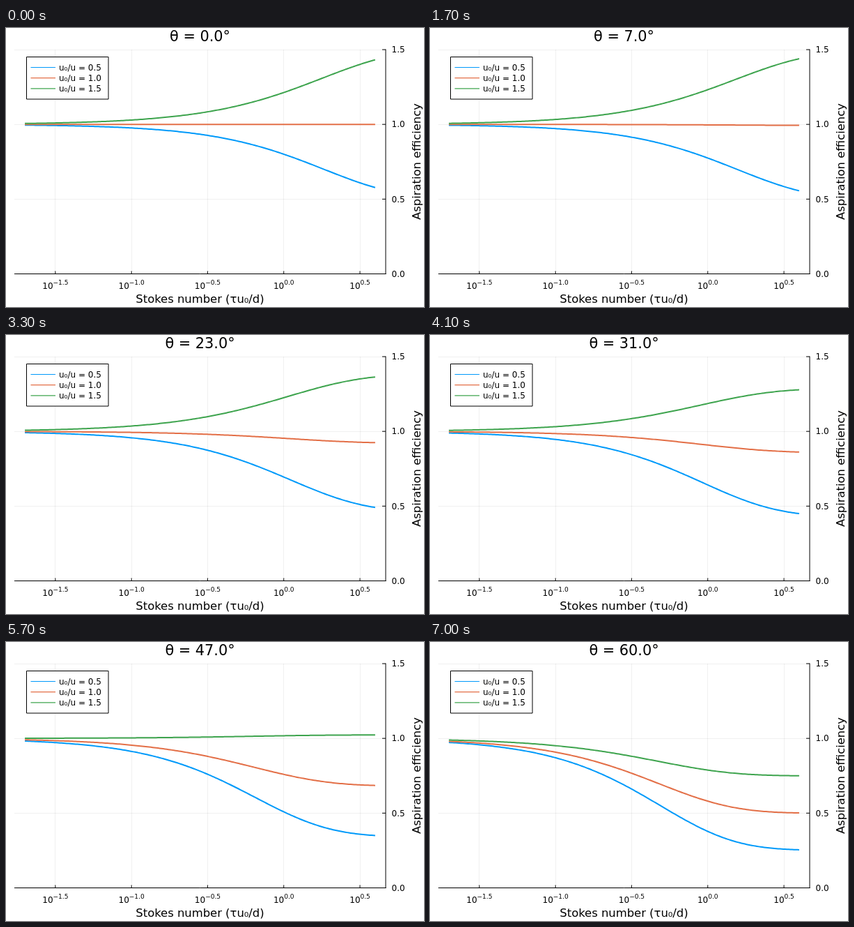
An HTML page with a canvas that plays this animation: 600x400 px, repeating every 8050 ms.

```html
<!DOCTYPE html>
<html lang="en">
<head>
<meta charset="utf-8">
<title>Aspiration efficiency</title>
<style>
html, body { margin: 0; width: 100%; height: 100%; overflow: hidden; background: #fff; }
canvas { display: block; width: 600px; height: 400px; }
</style>
</head>
<body>
<canvas id="chart" width="600" height="400"></canvas>
<script>
const ctx = document.getElementById("chart").getContext("2d");

const LOOP = 8050, HOLD = 1050, STEP = 50;
const LEFT = 12, RIGHT = 545, TOP = 31, BOTTOM = 352.5;
const LOG_MIN = -1.7, LOG_MAX = 0.6;
const SERIES = [
  { ratio: 0.5, color: "#009afa" },
  { ratio: 1.0, color: "#e36f47" },
  { ratio: 1.5, color: "#3ea44e" }
];
const X_TICKS = [-1.5, -1, -0.5, 0, 0.5];
const Y_TICKS = [0, 0.5, 1, 1.5];

// The x axis is 3% wider than the data on each side.
const pad = 0.03 * (LOG_MAX - LOG_MIN);
const xAt = log => LEFT + (log - LOG_MIN + pad) / (LOG_MAX - LOG_MIN + 2 * pad) * (RIGHT - LEFT);
const yAt = value => BOTTOM - value / 1.5 * (BOTTOM - TOP);
const crisp = v => Math.floor(v) + 0.5;

function line(x1, y1, x2, y2, color, width) {
  ctx.strokeStyle = color;
  ctx.lineWidth = width;
  ctx.beginPath();
  ctx.moveTo(x1, y1);
  ctx.lineTo(x2, y2);
  ctx.stroke();
}

function setFont(size) {
  ctx.font = `${size}px "DejaVu Sans", sans-serif`;
}

function text(str, x, y, size, align = "left") {
  setFont(size);
  ctx.fillStyle = "#000";
  ctx.textAlign = align;
  ctx.fillText(str, x, y);
}

function powerLabel(exponent, x, y) {
  const power = exponent.toFixed(1).replace("-", "−");
  setFont(12);
  const baseWidth = ctx.measureText("10").width;
  setFont(9);
  const start = x - (baseWidth + ctx.measureText(power).width) / 2;
  text("10", start, y, 12);
  text(power, start + baseWidth, y - 5.5, 9);
}

function drawAxes() {
  const grid = "rgba(0,0,0,0.06)";
  for (const v of X_TICKS) line(crisp(xAt(v)), TOP, crisp(xAt(v)), BOTTOM, grid, 1);
  for (const v of Y_TICKS) line(LEFT, crisp(yAt(v)), RIGHT, crisp(yAt(v)), grid, 1);

  line(LEFT, BOTTOM, RIGHT + 0.5, BOTTOM, "#000", 1);
  line(RIGHT, TOP - 0.5, RIGHT, BOTTOM + 0.5, "#000", 1);
  for (const v of X_TICKS) {
    line(xAt(v), BOTTOM, xAt(v), BOTTOM - 4, "#000", 1);
    powerLabel(v, xAt(v), 373.5);
  }
  for (const v of Y_TICKS) {
    line(RIGHT, yAt(v), RIGHT - 5, yAt(v), "#000", 1);
    text(v.toFixed(1), 553.5, yAt(v) + 4.3, 12);
  }

  text("Stokes number (τu₀/d)", 278.5, 393.5, 16.4, "center");
  ctx.save();
  ctx.translate(595, 191.5);
  ctx.rotate(-Math.PI / 2);
  text("Aspiration efficiency", 0, 0, 16.4, "center");
  ctx.restore();
}

function drawLegend() {
  ctx.fillStyle = "#fff";
  ctx.fillRect(29.5, 41.5, 117.5, 60.5);
  ctx.strokeStyle = "#000";
  ctx.lineWidth = 1;
  ctx.strokeRect(29.5, 41.5, 117.5, 60.5);
  SERIES.forEach(({ ratio, color }, i) => {
    const y = 56.5 + 15.2 * i;
    line(35.5, y, 71, y, color, 1.2);
    text(`u₀/u = ${ratio.toFixed(1)}`, 76, y + 4.3, 12);
  });
}

const saturate = v => v / (1 + v);

// Sampling efficiency of a thin-walled probe inclined by an angle in degrees.
function efficiency(stokes, ratio, angle) {
  const s = stokes * Math.exp(0.022 * angle);
  const beta = saturate((2 + 0.617 * ratio) * s) / saturate(2.617 * s)
    * saturate(0.55 * s * Math.exp(0.25 * s));
  return 1 + (ratio * Math.cos(angle * Math.PI / 180) - 1) * beta;
}

function drawCurve({ ratio, color }, angle) {
  const samples = 200;
  ctx.strokeStyle = color;
  ctx.lineWidth = 2;
  ctx.lineJoin = "round";
  ctx.beginPath();
  for (let i = 0; i <= samples; i++) {
    const log = LOG_MIN + (LOG_MAX - LOG_MIN) * i / samples;
    ctx.lineTo(xAt(log), yAt(efficiency(10 ** log, ratio, angle)));
  }
  ctx.stroke();
}

function angleAt(time) {
  const steps = Math.floor((time - HOLD) / STEP) + 1;
  return Math.min(60, Math.max(0, steps * 0.5));
}

function draw(time) {
  const angle = angleAt(time);
  ctx.fillStyle = "#fff";
  ctx.fillRect(0, 0, 600, 400);
  drawAxes();
  for (const series of SERIES) drawCurve(series, angle);
  drawLegend();
  text(`θ = ${angle.toFixed(1)}°`, 278.5, 18.5, 20.8, "center");
}

let start;
function tick(now) {
  start ??= now;
  draw((now - start) % LOOP);
  requestAnimationFrame(tick);
}
draw(0);
requestAnimationFrame(tick);
</script>
</body>
</html>
```
